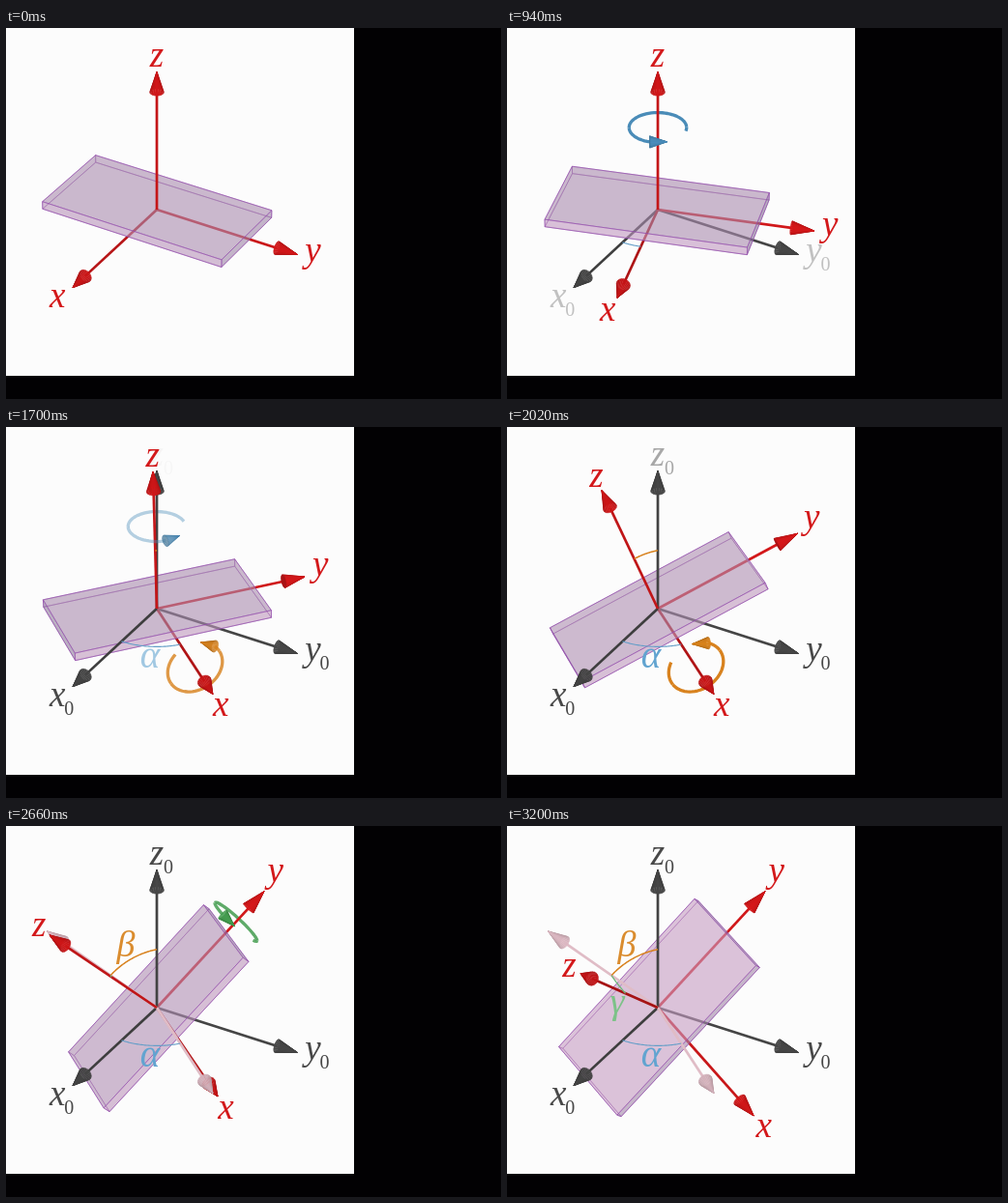
Recreate the animation shown at these times as an HTML page with a canvas. Size 512 px wide and 384 px high, loop 4220 ms.

```html
<!DOCTYPE html>
<html lang="en">
<head>
<meta charset="utf-8">
<title>Three successive rotations</title>
<style>
  html, body { margin: 0; width: 100%; height: 100%; overflow: hidden; background: #020103; }
  canvas { display: block; }
</style>
</head>
<body>
<canvas id="stage" width="512" height="384"></canvas>
<script>
const ctx = document.getElementById('stage').getContext('2d');
const LOOP = 4220, DEG = Math.PI / 180;
const ORIGIN = [156, 188], SCALE = 166, CAMERA = 18;
const AZIMUTH = 30.4 * DEG, ELEVATION = 33 * DEG;
const HALF = [0.318, 0.641, 0.027];
const RING = 0.176, ARC = 0.427;

const RED = [211, 24, 26], GREY = [72, 72, 72], GHOST = [224, 188, 198];
const BLUE = [74, 140, 184], ORANGE = [216, 130, 30], GREEN = [66, 156, 78];

// Each turn: time span, final angle, ring position and the ring's tail angle.
const TURNS = [
  { start: 520, end: 1606, angle: 50, at: 0.6, tail: 90, color: BLUE },
  { start: 1603, end: 2473, angle: 45, at: 0.69, tail: 135, color: ORANGE },
  { start: 2560, end: 3040, angle: 25, at: 0.735, tail: 112, color: GREEN }
];

// Vectors are [right, down, towards the viewer].
const add = (...vs) => [0, 1, 2].map(i => vs.reduce((sum, v) => sum + v[i], 0));
const mul = (v, k) => v.map(n => n * k);
const dot = (a, b) => a[0] * b[0] + a[1] * b[1] + a[2] * b[2];
const cross = (a, b) => [a[1] * b[2] - a[2] * b[1], a[2] * b[0] - a[0] * b[2], a[0] * b[1] - a[1] * b[0]];
const unit = v => mul(v, 1 / Math.hypot(...v));
const blend = (u, v, angle) => add(mul(u, Math.cos(angle)), mul(v, Math.sin(angle)));
const turn = (u, v, angle) => [blend(u, v, angle), blend(v, mul(u, -1), angle)];
const clamp = n => Math.max(0, Math.min(1, n));
const ramp = (t, from, to) => clamp((t - from) / (to - from));
const ease = u => (1 - Math.cos(Math.PI * u)) / 2;
const css = (c, k = 1) => `rgb(${c.map(n => Math.round(n * k)).join()})`;

const sinA = Math.sin(AZIMUTH), cosA = Math.cos(AZIMUTH);
const sinE = Math.sin(ELEVATION), cosE = Math.cos(ELEVATION);
const X0 = [-sinA, cosA * sinE, cosA * cosE];
const Y0 = [cosA, sinA * sinE, sinA * cosE];
const Z0 = [0, -cosE, sinE];

function project(v) {
  const k = SCALE / (1 - v[2] / CAMERA);
  return [ORIGIN[0] + v[0] * k, ORIGIN[1] + v[1] * k];
}

function trace(points, closed) {
  ctx.beginPath();
  points.forEach(p => ctx.lineTo(...project(p)));
  if (closed) ctx.closePath();
}

function line(points, color, width) {
  trace(points);
  ctx.strokeStyle = color;
  ctx.lineWidth = width;
  ctx.stroke();
}

function cone(base, tip, radius, color) {
  const dir = unit(add(tip, mul(base, -1)));
  const u = unit(cross(dir, Math.abs(dir[2]) < 0.9 ? [0, 0, 1] : [1, 0, 0]));
  const v = cross(dir, u);
  const count = 20, step = 2 * Math.PI / count;
  const rim = k => add(base, mul(blend(u, v, k * step), radius));
  const paint = (points, shade) => {
    trace(points, true);
    ctx.fillStyle = ctx.strokeStyle = css(color, shade);
    ctx.lineWidth = 0.4;
    ctx.fill();
    ctx.stroke();
  };
  const sides = [...Array(count).keys()]
    .map(k => ({ k, facing: blend(u, v, (k + 0.5) * step)[2] }))
    .sort((a, b) => a.facing - b.facing);
  for (const { k, facing } of sides) paint([tip, rim(k), rim(k + 1)], 0.82 + 0.2 * Math.max(0, facing));
  if (dir[2] < 0) paint([...Array(count).keys()].map(rim), 0.8);
}

function axis(dir, color) {
  const neck = mul(dir, 0.85);
  const shade = 0.57 + 0.43 * Math.hypot(dir[0], dir[1]);
  line([[0, 0, 0], neck], css(color, color === GHOST ? 1 : shade), 2.7);
  cone(neck, mul(dir, 0.993), 0.0425, color);
}

function arcPoints(center, u, v, radius, from, to) {
  const count = 48;
  return Array.from({ length: count + 1 }, (_, i) =>
    add(center, mul(blend(u, v, from + (to - from) * i / count), radius)));
}

function ring(r, front) {
  if (!r.alpha) return;
  ctx.globalAlpha = r.alpha;
  const center = mul(r.axis, r.at);
  const tail = r.tail * DEG, neck = tail + 268 * DEG, tip = tail + 302 * DEG;
  const points = arcPoints(center, r.u, r.v, RING, tail, neck);
  const isFront = p => p[2] >= center[2];
  let run = [];
  points.forEach((p, i) => {
    const visible = isFront(p) === front;
    if (visible) run.push(p);
    if (run.length && (!visible || i === points.length - 1)) {
      if (!visible) run.push(p);
      line(run, css(r.color), 3.3);
      run = [];
    }
  });
  const at = angle => add(center, mul(blend(r.u, r.v, angle), RING));
  if (isFront(at(neck)) === front) cone(at(neck), at(tip), 0.036, r.color);
  ctx.globalAlpha = 1;
}

function plate(axes) {
  const corner = signs => add(...axes.map((a, i) => mul(a, signs[i] * HALF[i])));
  const square = [[-1, -1], [-1, 1], [1, 1], [1, -1]];
  const faces = [];
  for (let n = 0; n < 3; n++) for (const side of [-1, 1]) {
    const points = square.map(([p, q]) => {
      const signs = [];
      signs[n] = side;
      signs[(n + 1) % 3] = p;
      signs[(n + 2) % 3] = q;
      return corner(signs);
    });
    faces.push({ points, facing: axes[n][2] * side });
  }
  faces.sort((a, b) => a.facing - b.facing);
  for (const { points, facing } of faces) {
    trace(points, true);
    if (facing > 0) {
      const c = [121 + 90 * facing, 111 + 53 * facing, 139 + 66 * facing].map(Math.round);
      ctx.fillStyle = `rgba(${c.join()},0.6)`;
      ctx.fill();
    }
    ctx.strokeStyle = 'rgba(146,76,172,0.65)';
    ctx.lineWidth = 0.9;
    ctx.stroke();
  }
}

function write(text, x, baseline, color, alpha = 1, size = 37, style = 'italic') {
  if (!alpha) return;
  ctx.globalAlpha = alpha;
  ctx.font = `${style} ${size}px "Liberation Serif", serif`;
  ctx.fillStyle = css(color);
  ctx.fillText(text, x, baseline);
  ctx.globalAlpha = 1;
}

const LABELS = {
  x: { gap: [18, 14], dx: -2, dy: 10.5 },
  y: { gap: [14, 16], dx: 1.5, dy: 2.5 },
  z: { gap: [12, 13], dx: 0, dy: 9 }
};

function axisLabel(name, dir, color, alpha = 1, subscript = false) {
  const { gap, dx, dy } = LABELS[name];
  const [tx, ty] = project(dir);
  const length = Math.hypot(tx - ORIGIN[0], ty - ORIGIN[1]);
  const x = tx + (tx - ORIGIN[0]) / length * gap[0] + dx;
  const y = ty + (ty - ORIGIN[1]) / length * gap[1] + dy;
  write(name, x, y, color, alpha);
  if (subscript) write('0', x + 12, y + 8.5, color, alpha, 20, 'normal');
}

function draw(t) {
  ctx.fillStyle = '#020103';
  ctx.fillRect(0, 0, 512, 384);
  ctx.fillStyle = '#fcfcfc';
  ctx.fillRect(0, 0, 360, 360);

  const progress = TURNS.map(s => ease(ramp(t, s.start, s.end)));
  const [alpha, beta, gamma] = TURNS.map((s, i) => s.angle * DEG * progress[i]);
  const [x1, y1] = turn(X0, Y0, alpha);
  const [y2, z2] = turn(y1, Z0, beta);
  const [z3, x3] = turn(z2, x1, gamma);
  const body = [x3, y2, z3];

  const planes = [[Z0, x1, y1], [x1, y2, z2], [y2, z3, x3]];
  const rings = TURNS.map((s, i) => {
    const [dir, u, v] = planes[i];
    const shown = ramp(t, s.start, s.start + 120) * (1 - ramp(t, s.end, s.end + 160));
    return { ...s, axis: dir, u, v, alpha: shown };
  });

  const axes = [];
  if (alpha > 0) axes.push([X0, GREY], [Y0, GREY]);
  if (beta > 0) axes.push([Z0, GREY]);
  if (gamma > 0) axes.push([x1, GHOST], [z2, GHOST]);
  axes.push(...body.map(dir => [dir, RED]));
  const isAbove = ([dir]) => dot(dir, z3) > 0.001;

  rings.forEach(r => ring(r, false));
  axes.filter(a => !isAbove(a)).forEach(a => axis(...a));
  plate(body);
  axes.filter(isAbove).forEach(a => axis(...a));
  if (alpha > 0) line(arcPoints([0, 0, 0], X0, Y0, ARC, 0, alpha), css([100, 158, 200]), 1.1);
  if (beta > 0) line(arcPoints([0, 0, 0], Z0, mul(y1, -1), ARC, 0, beta), css(ORANGE), 1.5);
  if (gamma > 0) line(arcPoints([0, 0, 0], z2, x1, ARC, 0, gamma), css([110, 184, 122]), 1.3);
  rings.forEach(r => ring(r, true));

  axisLabel('x', X0, GREY, progress[0], true);
  axisLabel('y', Y0, GREY, progress[0], true);
  axisLabel('z', Z0, GREY, progress[1], true);
  ['x', 'y', 'z'].forEach((name, i) => axisLabel(name, body[i], RED));

  const named = TURNS.map(s => ramp(t, s.end, s.end + 160));
  write('α', 149, 249, [98, 164, 208], named[0], 39);
  write('β', 124, 135, [218, 140, 46], named[1], 38);
  write('γ', 114, 194, [124, 194, 136], named[2], 38);
}

ctx.textAlign = 'center';
ctx.lineJoin = 'round';
const began = performance.now();
function tick() {
  draw((performance.now() - began) % LOOP);
  requestAnimationFrame(tick);
}
tick();
</script>
</body>
</html>
```
